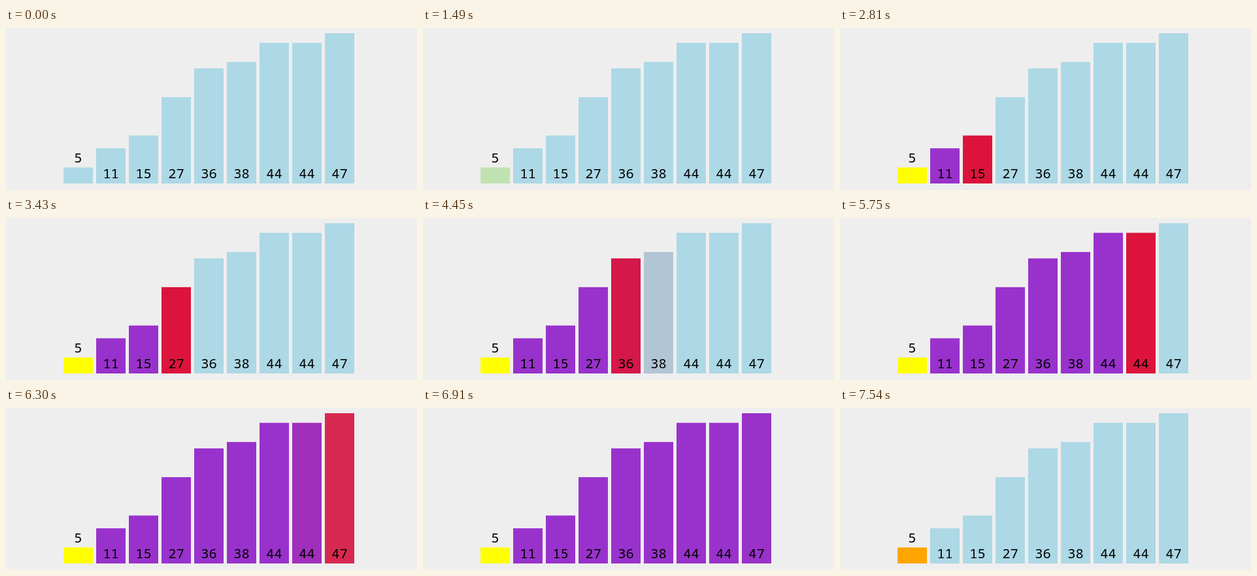
Recreate the animation shown at these times as an HTML page. Size 629 by 248 pixels, loop 8 s.

```html
<!DOCTYPE html>
<html lang="en">
<head>
<meta charset="utf-8">
<title>Selection sort bars</title>
<style>
  html, body { margin: 0; width: 100%; height: 100%; overflow: hidden; background: #eee; }
  svg { display: block; width: 629px; height: 248px; }
  text { font: 20.5px "Noto Sans Mono", "DejaVu Sans Mono", monospace; text-anchor: middle; fill: #000; }
</style>
</head>
<body>
<svg id="stage" viewBox="0 0 629 248"></svg>
<script>
const LOOP = 8000, BASE = 238, UNIT = 230 / 47;
const START = 1411, PERIOD = 592, FADE = 200;
const FIRST_TICK = 1488, TICK = 77.4;
const VALUES = [5, 11, 15, 27, 36, 38, 44, 44, 47];
const STEPS = VALUES.length + 2;
const IDLE = [173, 216, 230], MIN = [255, 255, 0], SCAN = [220, 20, 60],
      SEEN = [153, 50, 204], DONE = [255, 165, 0];

const stage = document.getElementById("stage");

function add(tag, attrs) {
  const el = document.createElementNS("http://www.w3.org/2000/svg", tag);
  for (const key in attrs) el.setAttribute(key, attrs[key]);
  return stage.appendChild(el);
}

const bars = VALUES.map((value, i) => {
  const x = 88 + 50 * i, height = value * UNIT;
  const bar = add("rect", { x, y: BASE - height, width: 45, height });
  // The label sits above a bar too short to hold it.
  const y = height < 30 ? 206 : 230;
  add("text", { x: x + 22.5, y }).textContent = value;
  return bar;
});

function easeInOut(t) {
  t = Math.min(1, Math.max(0, t));
  return t < 0.5 ? 4 * t ** 3 : 1 - 4 * (1 - t) ** 3;
}

// Colour of a bar once the given number of steps is complete.
function colorAt(bar, step) {
  if (step === STEPS) return bar ? IDLE : DONE;
  if (bar === 0) return step > 0 ? MIN : IDLE;
  const scan = step - 1;
  return bar < scan ? SEEN : bar === scan ? SCAN : IDLE;
}

function mix(a, b, p) {
  return `rgb(${a.map((v, i) => Math.round(v + (b[i] - v) * p))})`;
}

function draw(time) {
  // The picture refreshes on a coarse clock, so fades show as a few hard steps.
  const shot = FIRST_TICK + TICK * Math.floor((time - FIRST_TICK) / TICK);
  const last = Math.min(STEPS - 1, Math.floor((shot - START) / PERIOD));
  const p = easeInOut((shot - START - last * PERIOD) / FADE);
  bars.forEach((bar, i) => {
    bar.setAttribute("fill", mix(colorAt(i, last), colorAt(i, last + 1), p));
  });
}

const origin = performance.now();
function tick() {
  draw((performance.now() - origin) % LOOP);
  requestAnimationFrame(tick);
}

// Before the first step there is nothing to fade.
const idle = mix(IDLE, IDLE, 0);
bars.forEach(bar => bar.setAttribute("fill", idle));
tick();
</script>
</body>
</html>
```
